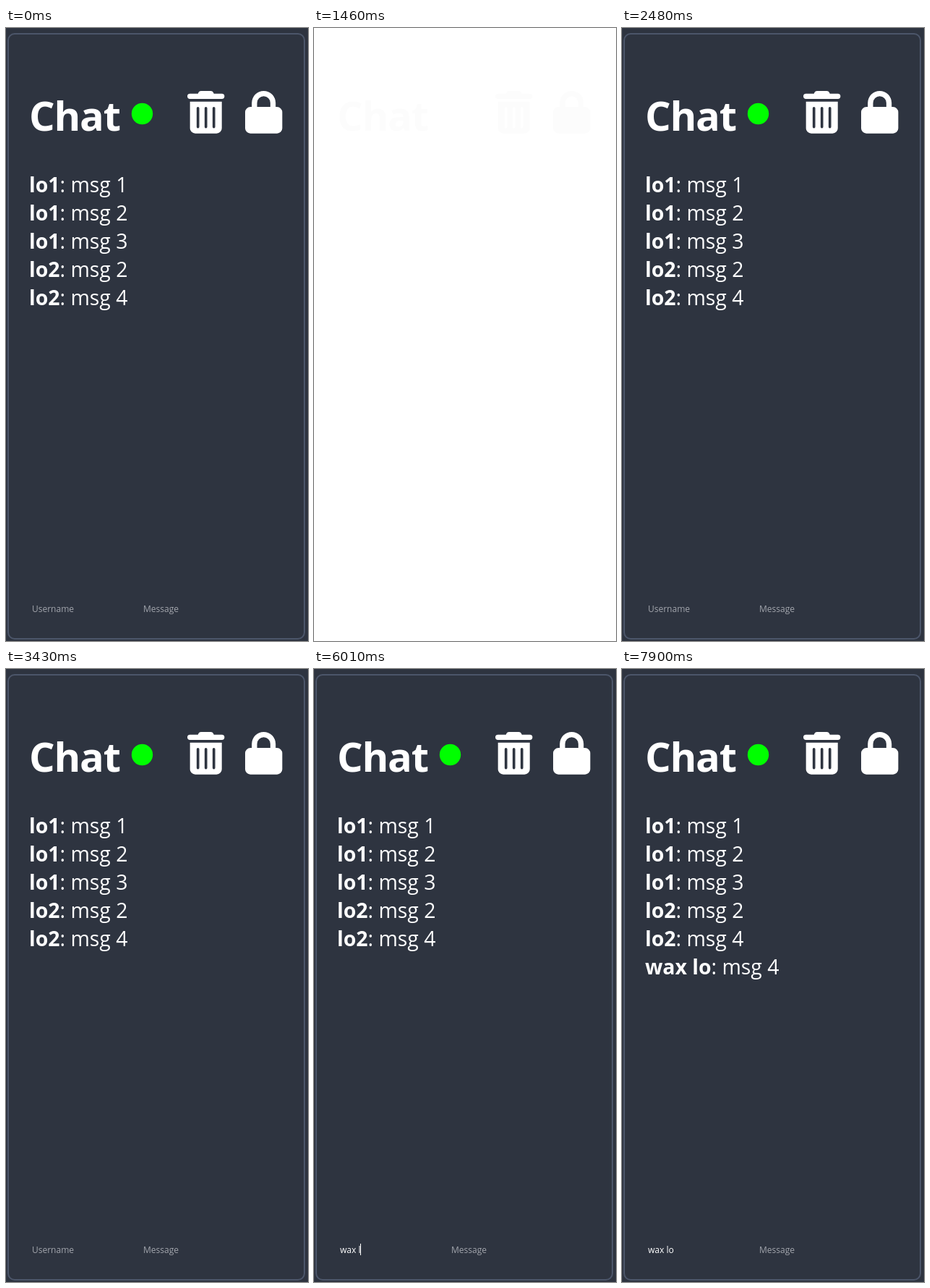
An HTML page that plays this animation: 418x847 px, repeating every 8 s.

```html
<!DOCTYPE html>
<html lang="en">
<head>
<meta charset="utf-8">
<title>Chat</title>
<style>
  html, body { margin: 0; width: 100%; height: 100%; overflow: hidden; background: #2e3440; }
  svg { display: block; width: 418px; height: 847px; font: 28.4px "Open Sans", "Noto Sans", sans-serif; fill: #fff; }
  text { white-space: pre; }
  .title { font-size: 56px; font-weight: 700; letter-spacing: -1.2px; }
  .name { font-weight: 700; }
  .field { font-size: 12px; }
  .empty { fill: #a2a5ac; }
</style>
</head>
<body>
<svg viewBox="0 0 418 847">
  <rect x="3" y="8" width="410" height="836" rx="9" fill="none" stroke="#4c566a" stroke-width="2"/>
  <circle id="dot" cx="188.5" cy="118.5" r="14.7"/>
  <g id="list"></g>
  <text id="user" class="field" x="36" y="807"></text>
  <text id="message" class="field" x="190" y="807"></text>
  <rect id="caret" y="794" width="1" height="16"/>
  <rect id="flash" width="418" height="847"/>
  <g id="head">
    <text class="title" x="32" y="142">Chat</text>
    <path transform="translate(251 87) scale(.1147)" d="M135 18Q144 0 164 0H284Q304 0 313 18L320 32H416a32 32 0 0 1 0 64H32a32 32 0 0 1 0-64H128zM32 128H416V448a64 64 0 0 1-64 64H96a64 64 0 0 1-64-64zM112 208V432a16 16 0 0 0 32 0V208a16 16 0 0 0-32 0zm96 0V432a16 16 0 0 0 32 0V208a16 16 0 0 0-32 0zm96 0V432a16 16 0 0 0 32 0V208a16 16 0 0 0-32 0z"/>
    <path transform="translate(331 87) scale(.1147)" fill-rule="evenodd" d="M80 192V144a144 144 0 0 1 288 0V192H384a64 64 0 0 1 64 64V448a64 64 0 0 1-64 64H64a64 64 0 0 1-64-64V256a64 64 0 0 1 64-64zM144 192H304V144a80 80 0 0 0-160 0z"/>
  </g>
</svg>
<script>
const LOOP = 8000, RELOAD = 1460, LOADED = 1590, LISTED = 1920, ONLINE = 2280, TABBED = 6210, SENT = 7400;
const $ = id => document.getElementById(id);
const newName = 'wax lo', newText = 'msg 4';
const messages = [['lo1', 'msg 1'], ['lo1', 'msg 2'], ['lo1', 'msg 3'], ['lo2', 'msg 2'], ['lo2', 'msg 4'], [newName, newText]];
const nameKeys = [5010, 5300, 5380, 5800, 6010, 6090];
const textKeys = [6580, 6650, 6720, 6790, 6860];
const caretOn = [[2930, 3430], [3930, 4470], [4970, 5550], [5800, 7360], [SENT, 7900]];

$('list').innerHTML = messages.map(([name, text], i) =>
  `<text x="32" y="${227 + 39 * i}"><tspan class="name">${name}</tspan>: ${text}</text>`).join('');
const rows = [...$('list').children];

const within = (t, from, to) => t >= from && t < to;
const show = (el, on) => el.setAttribute('visibility', on ? 'visible' : 'hidden');
const typed = (text, keys, t) => text.slice(0, keys.filter(k => t >= k).length);

function fill(id, value, hint) {
  $(id).textContent = value || hint;
  $(id).classList.toggle('empty', !value);
  return value ? Math.round($(id).getComputedTextLength()) : 0;
}

function draw(t) {
  const flash = within(t, RELOAD, LOADED);
  show($('flash'), flash);
  $('head').setAttribute('fill', flash ? '#fcfcfc' : '#fff');
  $('dot').setAttribute('fill', within(t, RELOAD, ONLINE) ? '#f00' : '#0f0');

  const listed = !within(t, RELOAD, LISTED);
  rows.forEach((row, i) => show(row, listed && (i < 5 || t >= SENT)));

  const nameWidth = fill('user', typed(newName, nameKeys, t), 'Username');
  const textWidth = fill('message', t < SENT ? typed(newText, textKeys, t) : '', 'Message');
  $('caret').setAttribute('x', t < TABBED ? 36 + nameWidth : 190 + textWidth);
  show($('caret'), caretOn.some(([from, to]) => within(t, from, to)));
}

const start = performance.now();
function frame() {
  draw((performance.now() - start) % LOOP);
  requestAnimationFrame(frame);
}
frame();
</script>
</body>
</html>
```
